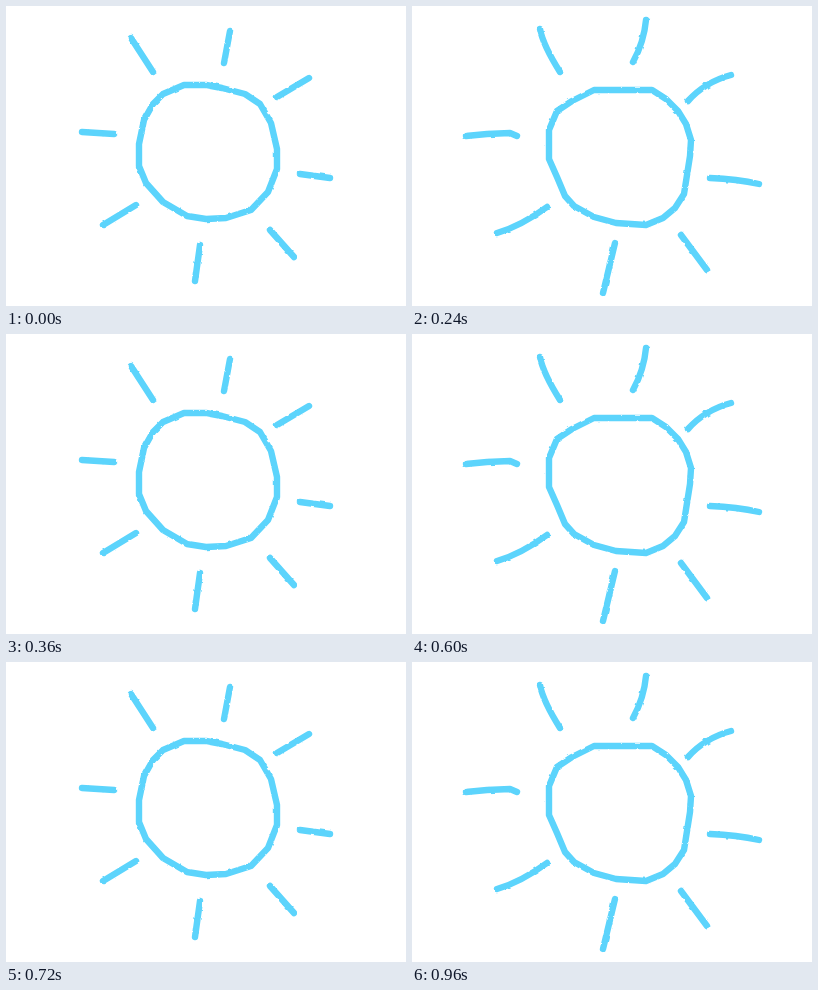
Animation, 400 px wide and 300 px high, one loop 1080 ms. Source, as an HTML page without scripts:

```html
<!DOCTYPE html>
<html lang="en">
<head>
<meta charset="utf-8">
<title>Hand-drawn sun</title>
<style>
  html, body { margin: 0; width: 100%; height: 100%; overflow: hidden; background: #fff; }
  svg { display: block; width: 100%; height: 100%; }
  .pose {
    fill: none;
    stroke: #5cd4fc;
    stroke-width: 6.4;
    stroke-linecap: round;
    stroke-linejoin: round;
    filter: url(#crayon);
    visibility: hidden;
    animation: show 360ms step-end infinite;
  }
  .small { animation-delay: -240ms; }
  .large { animation-delay: -120ms; }
  @keyframes show {
    0% { visibility: visible; }
    33.333%, 100% { visibility: hidden; }
  }
</style>
</head>
<body>
<svg viewBox="0 0 400 300">
  <!-- Slightly ragged stroke edges -->
  <filter id="crayon" filterUnits="userSpaceOnUse" x="0" y="0" width="400" height="300" color-interpolation-filters="sRGB">
    <feTurbulence type="fractalNoise" baseFrequency=".2" seed="4"/>
    <feDisplacementMap in="SourceGraphic" scale="2.5" xChannelSelector="R" yChannelSelector="G"/>
  </filter>

  <g class="pose medium">
    <path d="M178 79L200 79 216 82 239 88 254 98 265 117 271 143 271 163 262 186 245 204 220 212 200 213 181 210 157 196 140 177 133 160 133 138 138 114 147 98 157 88Z"/>
    <path d="M125 32L147 66M224 25L218 57M303 72L271 91M294 168L324 172M264 224L288 251M194 239L189 275M130 199L97 219M108 128L76 126"/>
  </g>

  <g class="pose small">
    <path d="M187 74L202 76 218 80 230 82 247 93 256 103 269 129 269 164 266 177 257 194 243 205 225 214 205 217 185 213 158 202 144 185 132 171 127 152 129 128 138 103 153 84 171 76Z"/>
    <path d="M129 37L145 64M222 31L215 56M298 75L269 90M293 168L306 170 320 174M262 223L280 243M192 236L186 269M128 198L102 212M106 126L81 126"/>
  </g>

  <g class="pose large">
    <path d="M182 84L240 84 254 93 266 105 274 118 279 134 278 150 272 188 263 202 251 212 234 219 204 217 182 211 162 200 153 190 145 171 137 153 137 124 145 105 160 95Z"/>
    <path d="M128 23Q131 39 148 66M234 14Q232 36 221 56M319 69Q293 76 276 95M298 172Q325 173 347 178M269 229L295 264M203 237L191 287M135 201Q109 220 85 227M105 130L98 127 75 128 54 130"/>
  </g>
</svg>
</body>
</html>
```
